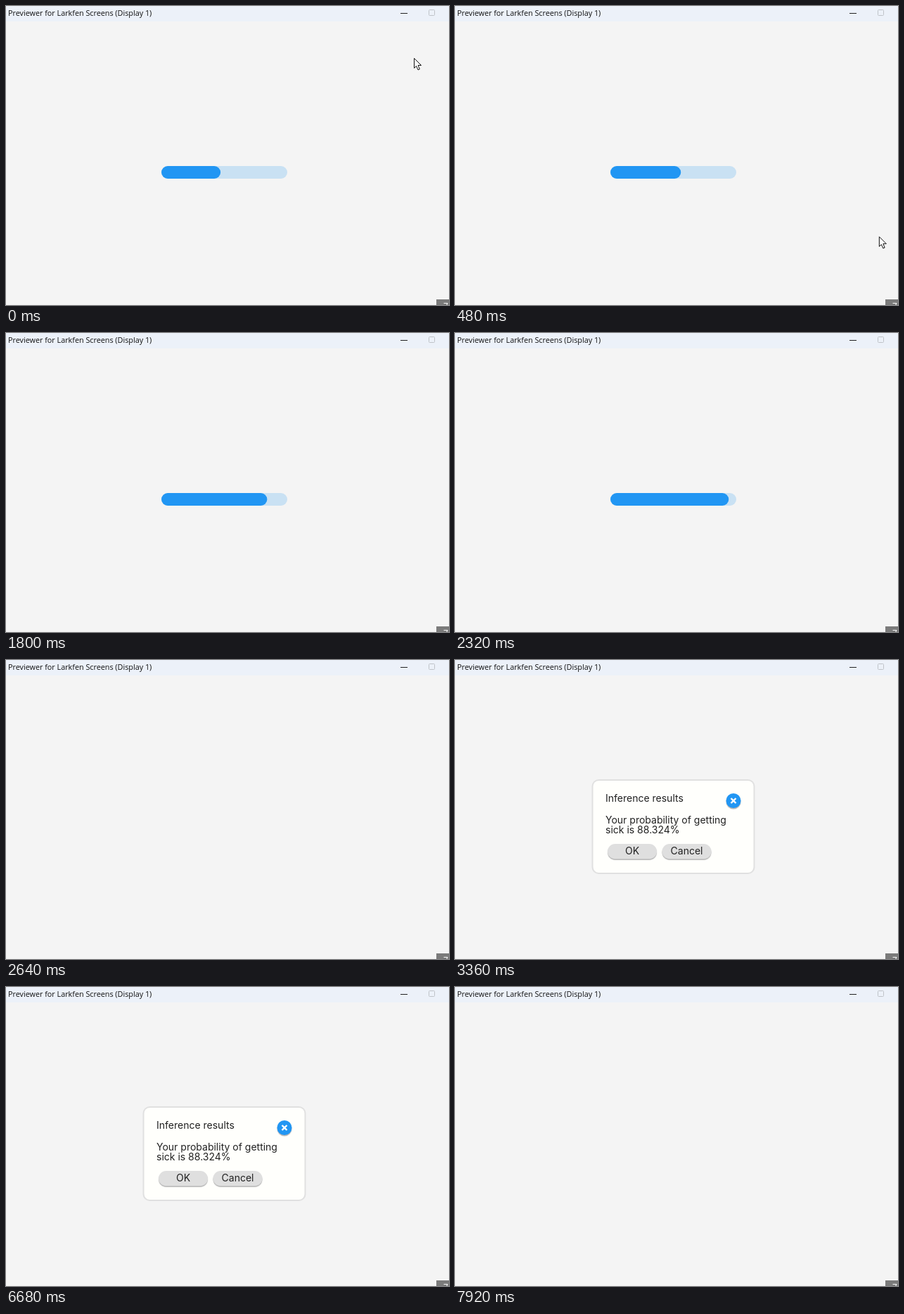
Animation, 630 px wide and 426 px high, one loop 8 s. Source, as an HTML page with a canvas:

```html
<!DOCTYPE html>
<html lang="en">
<head>
<meta charset="utf-8">
<title>Progress and result dialog</title>
<style>
  html, body { margin: 0; width: 100%; height: 100%; overflow: hidden; background: #f4f4f4; }
  canvas { display: block; }
</style>
</head>
<body>
<canvas id="stage" width="630" height="426"></canvas>
<script>
const ctx = document.getElementById('stage').getContext('2d');
const LOOP = 8000, TICK = 40;
const BLUE = '#2196f3', INK = '#212121';
const UI_FONT = '10.8px "Open Sans", sans-serif';
const DIALOG_FONT = '14px Inter, sans-serif';

function pill(x, y, w, h, r, fill) {
  ctx.beginPath();
  ctx.roundRect(x, y, w, h, r);
  ctx.fillStyle = fill;
  ctx.fill();
}

function label(text, x, y, font, color = INK, align = 'left') {
  ctx.font = font;
  ctx.fillStyle = color;
  ctx.textAlign = align;
  ctx.fillText(text, x, y);
}

function line(color, width, ...points) {
  ctx.beginPath();
  points.forEach(([x, y], i) => i ? ctx.lineTo(x, y) : ctx.moveTo(x, y));
  ctx.strokeStyle = color;
  ctx.lineWidth = width;
  ctx.stroke();
}

function withShadow(draw) {
  ctx.save();
  ctx.shadowColor = '#b4b4b4';
  ctx.shadowOffsetY = 1.5;
  ctx.shadowBlur = 1;
  draw();
  ctx.restore();
}

function drawWindow() {
  ctx.fillStyle = '#f4f4f4';
  ctx.fillRect(0, 0, 630, 426);
  ctx.fillStyle = '#ecf1f9';
  ctx.fillRect(0, 0, 630, 22);
  label('Previewer for Larkfen Screens (Display 1)', 3, 14, UI_FONT, '#111');
  line('#222', 1, [561, 10.5], [571, 10.5]);
  ctx.beginPath();
  ctx.roundRect(601.5, 5.5, 8, 8, 1);
  ctx.strokeStyle = '#bfc3c8';
  ctx.stroke();

  ctx.fillStyle = '#7b7b7b';
  ctx.fillRect(612, 418, 18, 8);
  label('7', 622, 432, '12px Inter, sans-serif', '#fff');
}

function drawProgress(time) {
  const percent = Math.min(100, 47 + Math.floor(time / 48.6));
  pill(221, 228, 179, 18, 9, '#c9e1f3');
  pill(221, 228, 1.79 * percent, 18, 9, BLUE);
}

function drawButton(text, x, w) {
  withShadow(() => pill(x, 262, w, 21.5, 10.75, '#dfdfdf'));
  label(text, x + w / 2, 277, DIALOG_FONT, INK, 'center');
}

function drawDialog() {
  pill(194.5, 170, 232, 135, 10, '#e0e0e0');
  pill(196.5, 172, 228, 131, 8, '#fffffc');
  label('Inference results', 214, 202, DIALOG_FONT);
  label('Your probability of getting', 214, 233, DIALOG_FONT);
  label('sick is 88.324%', 214, 247, DIALOG_FONT);

  withShadow(() => pill(385.5, 190, 21, 21, 10.5, BLUE));
  line('#fff', 2.4, [392.5, 197], [399.5, 204]);
  line('#fff', 2.4, [399.5, 197], [392.5, 204]);

  drawButton('OK', 217, 70);
  drawButton('Cancel', 294.5, 70);
}

function drawCursor(x, y) {
  ctx.save();
  ctx.translate(x + 0.5, y + 0.5);
  ctx.beginPath();
  [[0, 0], [0, 14], [3, 11], [5.5, 16.5], [7.8, 15.5], [5.5, 10], [10, 10]]
    .forEach(([px, py]) => ctx.lineTo(px, py));
  ctx.closePath();
  ctx.fillStyle = '#fff';
  ctx.fill();
  ctx.strokeStyle = '#111';
  ctx.lineWidth = 1;
  ctx.stroke();
  ctx.restore();
}

function drawPointer(time) {
  if (time < 720) {
    const p = Math.max(0, (time - 40) / 680);
    const eased = p * p * (3 - 2 * p);
    drawCursor(580 + 32 * eased, 74 + 356 * eased);
  } else if (time >= 3520 && time < 3800) {
    // brief peek over the lower edge
    const lift = Math.sin(Math.PI * (time - 3480) / 320);
    drawCursor(559, 426 - 8 * lift);
  }
}

function render(now) {
  const time = Math.floor((now % LOOP) / TICK) * TICK;
  drawWindow();
  if (time < 2640) drawProgress(time);
  if (time >= 3120 && time < 7920) drawDialog();
  drawPointer(time);
}

const start = performance.now();
function loop() {
  render(performance.now() - start);
  requestAnimationFrame(loop);
}
loop();
</script>
</body>
</html>
```
